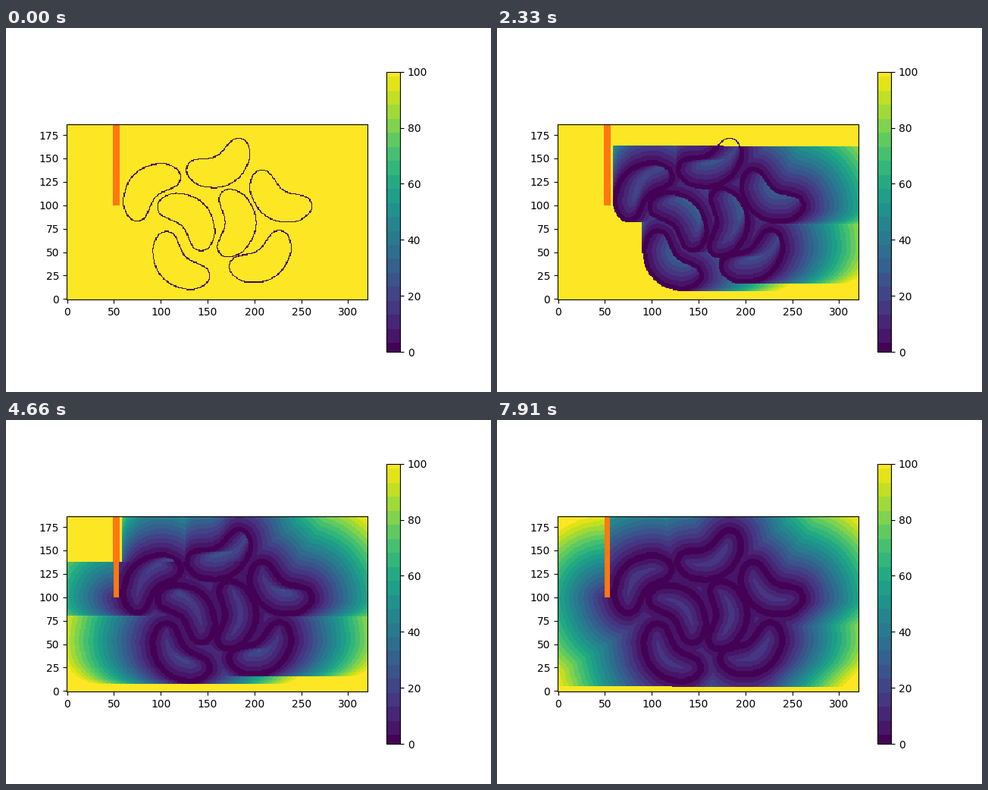
Animation of 640x480 px, one loop 8000 ms. Source, as a matplotlib script:

```python
"""Fast sweeping solution of the eikonal equation around bean-shaped curves."""
from itertools import product
from math import sqrt

import matplotlib.pyplot as plt
import numpy as np
from matplotlib.animation import FuncAnimation
from matplotlib.colors import ListedColormap

WIDTH, HEIGHT = 321, 187
FAR, WALL = 100.0, 200.0
CELLS_PER_STEP, STEP_MS = 2100, 100
LOOP_MS, INTERVAL = 8000, 20

# Upper half of the bean, hollow side towards +x
HALF_BEAN = np.array([(16, 0), (17.5, 9), (22, 20), (25, 32), (20, 41.5),
                      (9, 44.5), (-7, 38), (-18, 24), (-24, 9)]) / 1.236

# Centre x, centre y, direction of the hollow side in degrees
BEANS = [(117, 36.3, 44), (85.9, 118.2, -45), (164.8, 140.3, 117),
         (224, 104.7, 57), (131.8, 86.6, 225), (181.5, 80.4, 178),
         (210.2, 40.4, 123)]


def closed_spline(points, samples=60):
    """Catmull-Rom curve through a closed ring of points."""
    p0, p1, p2, p3 = (np.roll(points, k, axis=0)[:, None] for k in (1, 0, -1, -2))
    t = np.linspace(0, 1, samples, endpoint=False)[None, :, None]
    curve = (2 * p1 + (p2 - p0) * t + (2 * p0 - 5 * p1 + 4 * p2 - p3) * t**2
             + (3 * p1 - p0 - 3 * p2 + p3) * t**3) / 2
    return curve.reshape(-1, 2)


def initial_field():
    field = np.full((HEIGHT + 2, WIDTH + 2), FAR)
    blocked = np.zeros(field.shape, bool)
    field[101:-1, 50:58] = WALL
    blocked[101:-1, 51:57] = True
    outline = closed_spline(np.vstack([HALF_BEAN, HALF_BEAN[:0:-1] * (1, -1)]))
    for cx, cy, angle in BEANS:
        c, s = np.cos(np.radians(angle)), np.sin(np.radians(angle))
        x = cx + c * outline[:, 0] - s * outline[:, 1]
        y = cy + s * outline[:, 0] + c * outline[:, 1]
        field[np.rint(y).astype(int) + 1, np.rint(x).astype(int) + 1] = 0
    return field.tolist(), blocked.tolist()


def snapshot(u):
    return np.array(u)[1:-1, 1:-1]


def sweep(u, blocked, rows, cols, due):
    """Update every cell once, keeping a snapshot at regular cell counts."""
    shots = []
    for done, (y, x) in enumerate(product(rows, cols), 1):
        if not blocked[y][x]:
            a = min(u[y][x - 1], u[y][x + 1])
            b = min(u[y - 1][x], u[y + 1][x])
            if abs(a - b) >= 1:
                value = min(a, b) + 1
            else:
                value = (a + b + sqrt(2 - (a - b) ** 2)) / 2
            u[y][x] = min(u[y][x], value)
        if done == due:
            shots.append(snapshot(u))
            due += CELLS_PER_STEP
    return shots + [snapshot(u)]


def solve():
    u, blocked = initial_field()
    up, right = range(1, HEIGHT + 1), range(1, WIDTH + 1)
    down, left = up[::-1], right[::-1]
    # rows, columns, time of first snapshot, its cell count, snapshots shown
    plan = [(up, right, -70, 2100, 29),
            (up, left, 2760, 4560, 27),
            (down, left, 5410, 5800, 26)]
    times, shots = [], []
    for rows, cols, start, first, count in plan:
        shots += sweep(u, blocked, rows, cols, first)[:count]
        times += [start + STEP_MS * k for k in range(count)]
    return np.array(times), shots


def banded_viridis():
    values = np.arange(500) * 0.2 + 0.1
    bands = np.floor((values + 1.8) / 5) * 5 + 0.7
    cmap = ListedColormap(plt.get_cmap("viridis")(np.clip(bands, 0, 100) / 100))
    cmap.set_over("#ff7711")
    return cmap


times, shots = solve()

fig, ax = plt.subplots(figsize=(6.4, 4.8), dpi=100)
image = ax.imshow(shots[0], cmap=banded_viridis(), vmin=0, vmax=100,
                  origin="lower", interpolation="nearest")
fig.colorbar(image, ax=ax)


def update(frame):
    now = frame * INTERVAL + INTERVAL / 2
    image.set_data(shots[np.searchsorted(times, now, side="right") - 1])
    return [image]


anim = FuncAnimation(fig, update, frames=LOOP_MS // INTERVAL, interval=INTERVAL,
                     repeat=True, repeat_delay=0)
plt.show()
```
